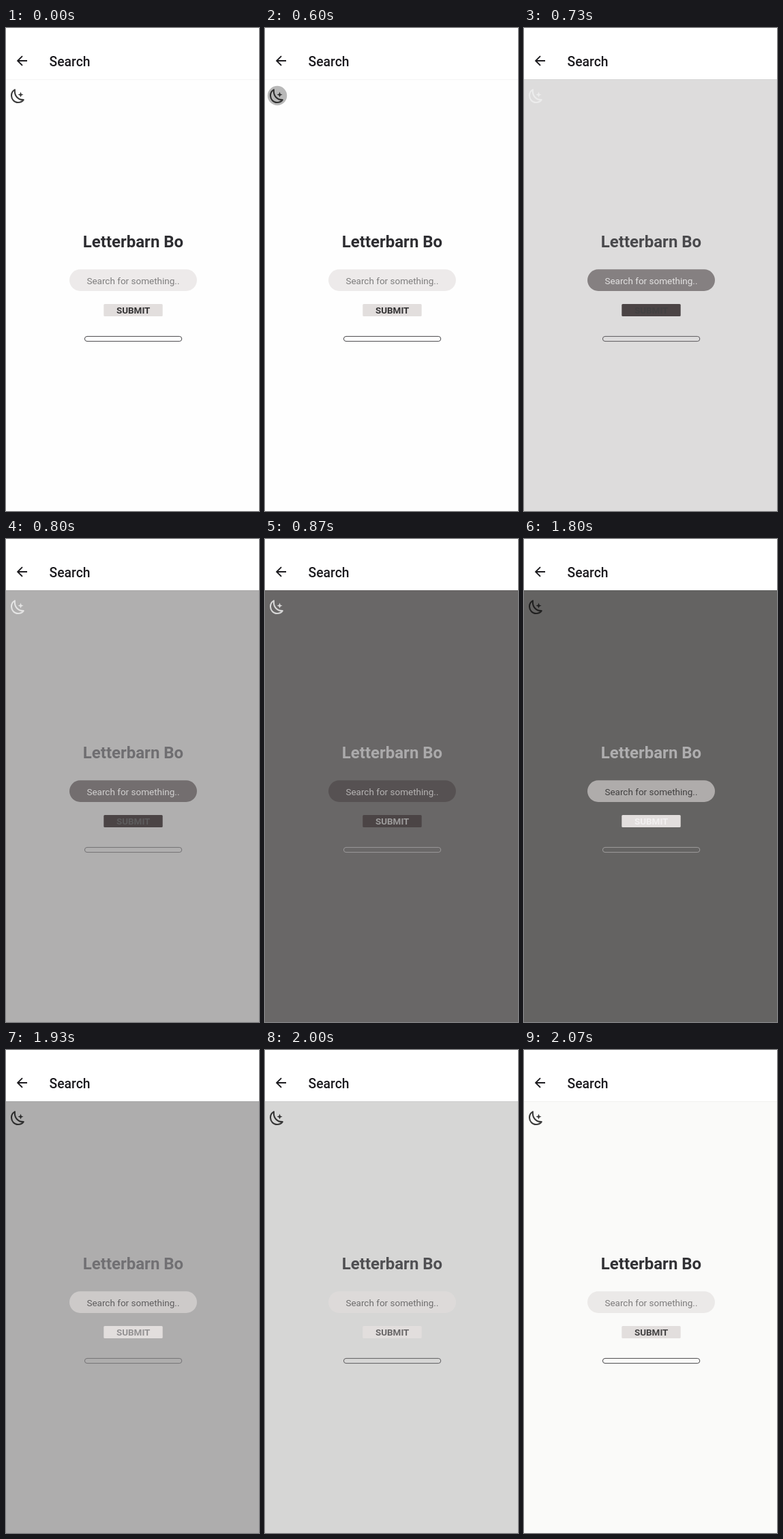
Animation, 371 px wide and 707 px high, one loop 2.94 s. Source, as an HTML page:

```html
<!DOCTYPE html>
<html lang="en">
<head>
<meta charset="utf-8">
<title>Search</title>
<style>
  html, body { margin: 0; width: 100%; height: 100%; overflow: hidden; background: #fff; }
  svg { display: block; width: 371px; height: 707px; font-family: Roboto, Arial, sans-serif; }

  /* --fade, --label: how far colours have gone to dark; --mode: instant switch */
  .stage {
    --fade: 0%; --label: 0%; --mode: 0%; --press: 0;
    --ink: color-mix(in srgb, #e9e8e7 var(--fade), #2d2d31);
    animation: theme 2940ms step-end infinite;
  }
  @keyframes theme {
    0%     { --fade: 0%;   --label: 0%;   --mode: 0%;   --press: 0; }
    20.4%  { --fade: 0%;   --label: 0%;   --mode: 0%;   --press: 1; }
    24.82% { --fade: 15%;  --label: 8%;   --mode: 100%; --press: 0; }
    27.2%  { --fade: 35%;  --label: 22%;  --mode: 100%; --press: 0; }
    29.58% { --fade: 67%;  --label: 55%;  --mode: 100%; --press: 0; }
    31.62% { --fade: 100%; --label: 92%;  --mode: 100%; --press: 0; }
    36.38% { --fade: 100%; --label: 100%; --mode: 100%; --press: 0; }
    61.22% { --fade: 69%;  --label: 100%; --mode: 0%;   --press: 0; }
    63.6%  { --fade: 52%;  --label: 74%;  --mode: 0%;   --press: 0; }
    65.64% { --fade: 36%;  --label: 50%;  --mode: 0%;   --press: 0; }
    68.02% { --fade: 18%;  --label: 27%;  --mode: 0%;   --press: 0; }
    70.4%  { --fade: 2%;   --label: 8%;   --mode: 0%;   --press: 0; }
    100%   { --fade: 0%;   --label: 0%;   --mode: 0%;   --press: 0; }
  }

  .page   { fill: color-mix(in srgb, #1f1d1c var(--fade), #fefefe); }
  .edge   { fill: #000; opacity: .035; }
  .ripple { fill: #b8b8b8; opacity: var(--press); }
  .moon   { color: color-mix(in srgb, #f0f0f0 var(--mode), #111); opacity: .82; }
  .title  { fill: var(--ink); font-size: 24px; font-weight: 700; }
  .tile   { fill: color-mix(in srgb, #4b4445 var(--mode), #e2dedd); }
  .field  { opacity: .6; }
  .hint   { fill: color-mix(in srgb, #e8e6e6 var(--mode), #2a2829); font-size: 13.5px; }
  .label  { fill: color-mix(in srgb, #f2f0f0 var(--label), #333233); font-size: 13.44px; font-weight: 700; }
  .bar    { fill: none; stroke: color-mix(in srgb, #c4c2c1 var(--fade), #48474a); }
  .head   { fill: #1c1b1f; font-size: 19.3px; font-weight: 500; }
  .arrow  { fill: none; stroke: #1c1b1f; stroke-width: 1.9; }
</style>
</head>
<body>
<svg class="stage" viewBox="0 0 371 707">
  <rect width="371" height="75" fill="#fff"/>
  <path class="arrow" d="M31 48H17.2M24 41.1L17.1 48L24 54.9"/>
  <text class="head" x="63.6" y="56">Search</text>

  <rect class="page" y="75" width="371" height="632"/>
  <rect class="edge" y="75" width="371" height="1"/>

  <circle class="ripple" cx="18" cy="99" r="14.2"/>
  <g class="moon">
    <path d="M12.9 90.4C9.4 92.2 7.9 95.6 8 99.2C8.2 104.8 12.4 109 17.6 109C21 109 24 107.6 25.7 105.1C17.6 105.3 12.1 99.4 12.9 90.4Z"
          fill="none" stroke="currentColor" stroke-width="2.1" stroke-linejoin="round"/>
    <path d="M21.5 93.6L22.6 96.5L25.5 97.6L22.6 98.7L21.5 101.6L20.4 98.7L17.5 97.6L20.4 96.5Z" fill="currentColor"/>
  </g>

  <text class="title" x="186.5" y="321.3" text-anchor="middle">Letterbarn Bo</text>

  <g class="field">
    <rect class="tile" x="93" y="353.3" width="187" height="31.6" rx="15.8"/>
    <text class="hint" x="118.4" y="374.7">Search for something..</text>
  </g>

  <rect class="tile" x="143.3" y="404" width="86.4" height="18" rx="1.5"/>
  <text class="label" x="186.7" y="418.2" text-anchor="middle">SUBMIT</text>

  <rect class="bar" x="115.4" y="451.4" width="142.4" height="7.2" rx="3.6"/>
</svg>
</body>
</html>
```
